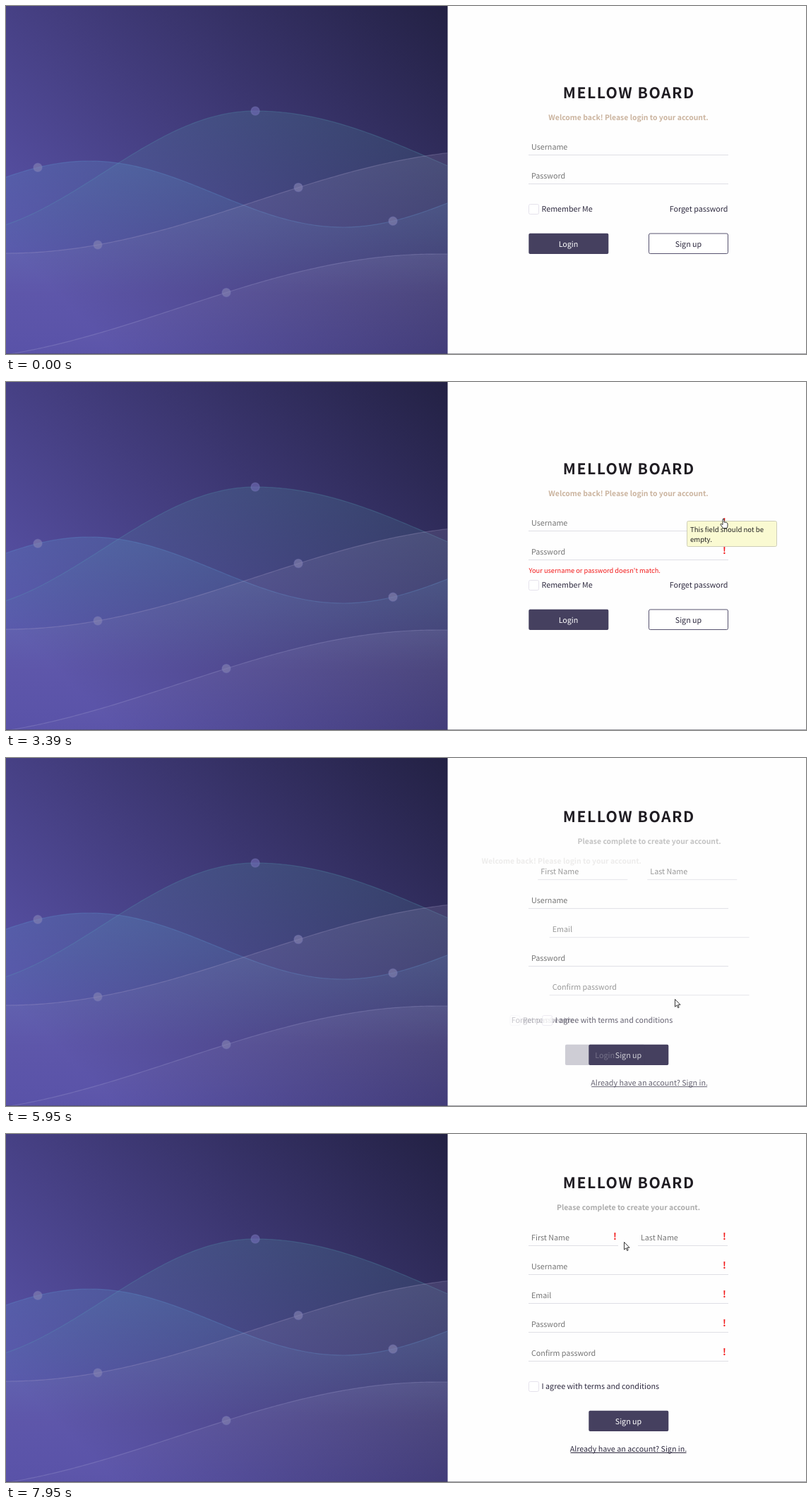
Animation of 1133 by 494 pixels, one loop 8000 ms. Source, as an HTML page with a canvas:

```html
<!DOCTYPE html>
<html lang="en">
<head>
<meta charset="utf-8">
<title>Login form</title>
<style>
html, body { margin: 0; width: 100%; height: 100%; overflow: hidden; background: #fefefe; }
canvas { display: block; }
</style>
</head>
<body>
<canvas id="stage" width="1133" height="494"></canvas>
<script>
const LOOP = 8000, SWITCH = 5730;
const FAMILY = '"Noto Sans CJK JP", "Noto Sans CJK SC", "Noto Sans CJK", "Open Sans", sans-serif';
const DARK = '#45405f', INK = '#2f2b40', HINT = '#757575', RED = '#f21818', RULE = '#dfdfe5';
const LEFT = 740, WIDE = 283, MID = 881.5, ROW = 41, PANEL = 625.5;

let ctx = document.getElementById('stage').getContext('2d');

const clamp = v => Math.max(0, Math.min(1, v));
const ramp = (t, a, b) => clamp((t - a) / (b - a));
const mix = (a, b, p) => a + (b - a) * p;

// cubic-bezier(.25, .1, .25, 1), solved by bisection
function ease(x) {
  let lo = 0, hi = 1;
  for (let i = 0; i < 20; i++) {
    const s = (lo + hi) / 2, r = 1 - s;
    if (.75 * r * s + s ** 3 < x) lo = s; else hi = s;
  }
  const s = lo, r = 1 - s;
  return .3 * r * r * s + 3 * r * s * s + s ** 3;
}

function text(str, x, y, { size = 10.74, color = INK, align = 'left', bold = false, gap = 0 } = {}) {
  ctx.font = (bold ? '700 ' : '400 ') + size + 'px ' + FAMILY;
  ctx.textRendering = 'geometricPrecision';
  ctx.letterSpacing = gap + 'px';
  ctx.textAlign = align;
  ctx.fillStyle = color;
  ctx.fillText(str, x + (align === 'center' ? gap / 2 : 0), y);
}

function box(x, y, w, h, fill, stroke) {
  ctx.beginPath();
  ctx.roundRect(x, y, w, h, 2);
  ctx.fillStyle = fill;
  ctx.fill();
  if (!stroke) return;
  ctx.strokeStyle = stroke;
  ctx.lineWidth = .9;
  ctx.stroke();
}

function field(label, x, y, w) {
  text(label, x + 4, y + 4, { color: HINT });
  ctx.fillStyle = RULE;
  ctx.fillRect(x, y + 11, w, 1);
}

function button(label, x, y, filled) {
  if (filled) box(x + .3, y - .3, 113, 29.2, DARK);
  else box(x + .5, y, 112, 28.5, '#fff', DARK);
  text(label, x + 56.5, y + 18.5, { align: 'center', color: filled ? '#fff' : INK });
}

function check(label, y, dx = 0, pink = 0) {
  if (pink) {
    ctx.fillStyle = `rgba(255,182,193,${.9 * pink})`;
    ctx.fillRect(LEFT + 14 + dx, y - 6, 169, 12);
  }
  box(LEFT + .5 + dx, y - 6.5, 14, 14, '#fff', '#e2dfea');
  text(label, LEFT + 18.5 + dx, y + 4);
}

const mark = (x, y) => text('!', x, y + 4.5, { size: 13, bold: true, color: RED, align: 'center' });

const heading = y => text('MELLOW BOARD', MID, y + 8,
  { size: 21.2, bold: true, color: '#1f1c22', align: 'center', gap: 1.5 });

const sub = (str, y, color, x = MID, align = 'center') =>
  text(str, x, y + 4, { size: 10.4, bold: true, color, align });

// Draws a part shifted sideways with some opacity
function faded(dx, alpha, draw) {
  ctx.save();
  ctx.globalAlpha = alpha;
  ctx.translate(dx, 0);
  draw();
  ctx.restore();
}

// Each wave swings between its crests and troughs; dots sit on it
const WAVES = [
  { turns: [[-77, 324], [353, 149], [873, 294]], dots: [353], rgb: '85,155,175', alpha: .22, depth: 250 },
  { turns: [[-241, 314], [118, 220], [477, 314], [836, 220]], dots: [45, 548], rgb: '95,155,210', alpha: .23, depth: 190 },
  { turns: [[0, 351], [705, 204]], dots: [130, 414], rgb: '175,165,205', alpha: .17, depth: 300 },
  { turns: [[-120, 505], [610, 352]], dots: [312], rgb: '170,165,210', alpha: .15, depth: 170 }
];

function height(turns, x) {
  const last = turns.length - 1;
  const i = Math.max(1, turns.findIndex(p => p[0] >= x)) ;
  const [a, b] = x > turns[last][0] ? [turns[last], turns[last]] : [turns[i - 1], turns[i]];
  return mix(a[1], b[1], (1 - Math.cos(Math.PI * ramp(x, a[0], b[0] + 1e-6))) / 2);
}

function wave({ turns, rgb, alpha, depth }) {
  ctx.beginPath();
  for (let x = -4; x <= 632; x += 4) ctx.lineTo(x, height(turns, x));
  ctx.strokeStyle = `rgba(${rgb},.28)`;
  ctx.lineWidth = 1.2;
  ctx.stroke();
  ctx.lineTo(632, 500);
  ctx.lineTo(-4, 500);
  const top = Math.min(...turns.map(p => p[1]));
  const g = ctx.createLinearGradient(0, top, 0, top + depth);
  g.addColorStop(0, `rgba(${rgb},${alpha})`);
  g.addColorStop(1, `rgba(${rgb},0)`);
  ctx.fillStyle = g;
  ctx.fill();
}

function dot(x, y) {
  ctx.beginPath();
  ctx.arc(x, y, 6, 0, 7);
  ctx.fillStyle = y < 200 ? 'rgba(115,110,185,.6)' : 'rgba(135,133,178,.6)';
  ctx.fill();
  ctx.strokeStyle = 'rgba(125,125,185,.35)';
  ctx.lineWidth = 1.5;
  ctx.stroke();
}

function paintPanel() {
  const layer = document.createElement('canvas'), main = ctx;
  layer.width = 626;
  layer.height = 494;
  ctx = layer.getContext('2d');
  ctx.beginPath();
  ctx.rect(0, 0, PANEL, 494);
  ctx.clip();
  const g = ctx.createLinearGradient(593, -33, 33, 527);
  g.addColorStop(0, '#232144');
  g.addColorStop(.5, '#433d7e');
  g.addColorStop(.86, '#5952a8');
  ctx.fillStyle = g;
  ctx.fillRect(0, 0, 626, 494);
  WAVES.forEach(wave);
  for (const { turns, dots } of WAVES) for (const x of dots) dot(x, height(turns, x));
  ctx = main;
  return layer;
}

// Pointer moves: start time, end time, where the tip arrives
const ENTRY = [1061, 470];
const MOVES = [
  [70, 670, 967, 327], [820, 1210, 828, 340], [1850, 2290, 1012, 231],
  [2410, 2610, 1023, 183], [2650, 2770, 1016, 194], [3400, 3640, 1016, 235],
  [4480, 5170, 905, 304], [5240, 5560, 947, 342], [6250, 6640, 898, 408],
  [7450, 7950, 875, 153]
];

function tipAt(t) {
  let [x, y] = ENTRY;
  for (const [from, to, nx, ny] of MOVES) {
    const p = ramp(t, from, to);
    x = mix(x, nx, p);
    y = mix(y, ny, p);
  }
  return [Math.round(x), Math.round(y)];
}

function overLink(x, y, signup) {
  const on = (l, t, w, h) => x >= l && x <= l + w && y >= t && y <= t + h;
  if (signup) return on(825, 393, 113, 29);
  return on(LEFT, 323, 113, 29) || on(910, 323, 113, 29) || on(940, 281, 83, 13) ||
    on(1013, 192, 8, 13) || on(1013, 192 + ROW, 8, 13);
}

const ARROW = new Path2D('M.5 .5V11.2L3 8.9L4.7 12.6L6.2 11.9L4.6 8.3H8Z');
const HAND = new Path2D('M-1 .8Q0-.4 1 .8V5Q5.5 4.5 6 7V10Q5.8 12 5 13.5H-.8Q-1.5 11.5-4 8.6Q-4.5 6-1 8.6Z');

function pointer(t, signup) {
  if (t < 70) return;
  const [x, y] = tipAt(t), shape = overLink(x, y, signup) ? HAND : ARROW;
  ctx.save();
  ctx.translate(x, y);
  ctx.fillStyle = '#fff';
  ctx.strokeStyle = '#222';
  ctx.lineWidth = .9;
  ctx.fill(shape);
  ctx.stroke(shape);
  ctx.restore();
}

function shake(t, start) {
  const p = ramp(t, start, start + 500);
  return 4 * Math.cos(10 * Math.PI * p) * Math.min(1, 1.24 * Math.sin(Math.PI * p));
}

function hint(y, alpha) {
  if (!alpha) return;
  const style = { size: 9.6, color: '#222' };
  faded(0, alpha, () => {
    box(964.5, y + .5, 127, 36, '#fafad2', '#c9c9b4');
    text('This field should not be', 969, y + 16, style);
    text('empty.', 969, y + 30, style);
  });
}

function loginPage(t) {
  heading(123);
  sub('Welcome back! Please login to your account.', 158, '#cbb49f');
  field('Username', LEFT, 200, WIDE);
  field('Password', LEFT, 200 + ROW, WIDE);
  check('Remember Me', 288);
  text('Forget password', 1022.5, 291.5, { align: 'right' });
  button('Login', LEFT, 323, true);
  button('Sign up', 910, 323, false);
  if (t >= 1600) {
    const x = 1017.5 + shake(t, 1600);
    mark(x, 198);
    mark(x, 198 + ROW);
    text("Your username or password doesn't match.", LEFT + .5, 271, { size: 9.28, color: RED });
  }
  hint(197, ramp(t, 2770, 2900) * (1 - ramp(t, 3400, 3480)));
  hint(197 + ROW, ramp(t, 3620, 3760) * (1 - ramp(t, 4480, 4560)));
}

function signupPage(t) {
  const p = ease(ramp(t, SWITCH, SWITCH + 500)), q = 1 - p;
  const enter = (w, draw) => faded(.4 * q * w, p, draw);
  const leave = (w, draw) => q > 0 && faded(-.4 * p * w, q, draw);
  const bad = t >= 6870, dx = bad ? shake(t, 6870) : 0;
  const row = i => 147 + ROW * i;
  ctx.save();
  ctx.translate(0, 54 * q);
  heading(69);
  enter(WIDE, () => sub('Please complete to create your account.', 104, '#adadad'));
  leave(225, () => sub('Welcome back! Please login to your account.', 131.5, '#c0bcb8', LEFT, 'left'));
  enter(127, () => field('First Name', LEFT, row(0), 127));
  enter(127, () => field('Last Name', 895, row(0), 127));
  field('Username', LEFT, row(1), WIDE);
  enter(WIDE, () => field('Email', LEFT, row(2), WIDE));
  field('Password', LEFT, row(3), WIDE);
  enter(WIDE, () => field('Confirm password', LEFT, row(4), WIDE));
  leave(90, () => check('Remember Me', 358));
  leave(82, () => text('Forget password', LEFT, 361.5));
  enter(183, () => check('I agree with terms and conditions', 358, 2 * dx, bad ? 1 - ramp(t, 7370, 7700) : 0));
  button('Sign up', 825, 393, true);
  leave(113, () => button('Login', 825, 393, true));
  enter(WIDE, () => {
    text('Already have an account? Sign in.', MID, 451, { align: 'center' });
    ctx.fillStyle = INK;
    ctx.fillRect(799.5, 452, 164, 1);
  });
  if (bad) {
    mark(862.5 + dx, row(0) - 2);
    for (let i = 0; i < 5; i++) mark(1017.5 + dx, row(i) - 2);
  }
  ctx.restore();
}

const panel = paintPanel();

function draw(now) {
  const t = now % LOOP, signup = t >= SWITCH;
  ctx.fillStyle = '#fefefe';
  ctx.fillRect(0, 0, 1133, 494);
  (signup ? signupPage : loginPage)(t);
  ctx.drawImage(panel, 0, 0);
  ctx.fillStyle = 'rgba(70,68,80,.5)';
  ctx.fillRect(0, 493, 1133, 1);
  pointer(t, signup);
  requestAnimationFrame(draw);
}
requestAnimationFrame(draw);
</script>
</body>
</html>
```
